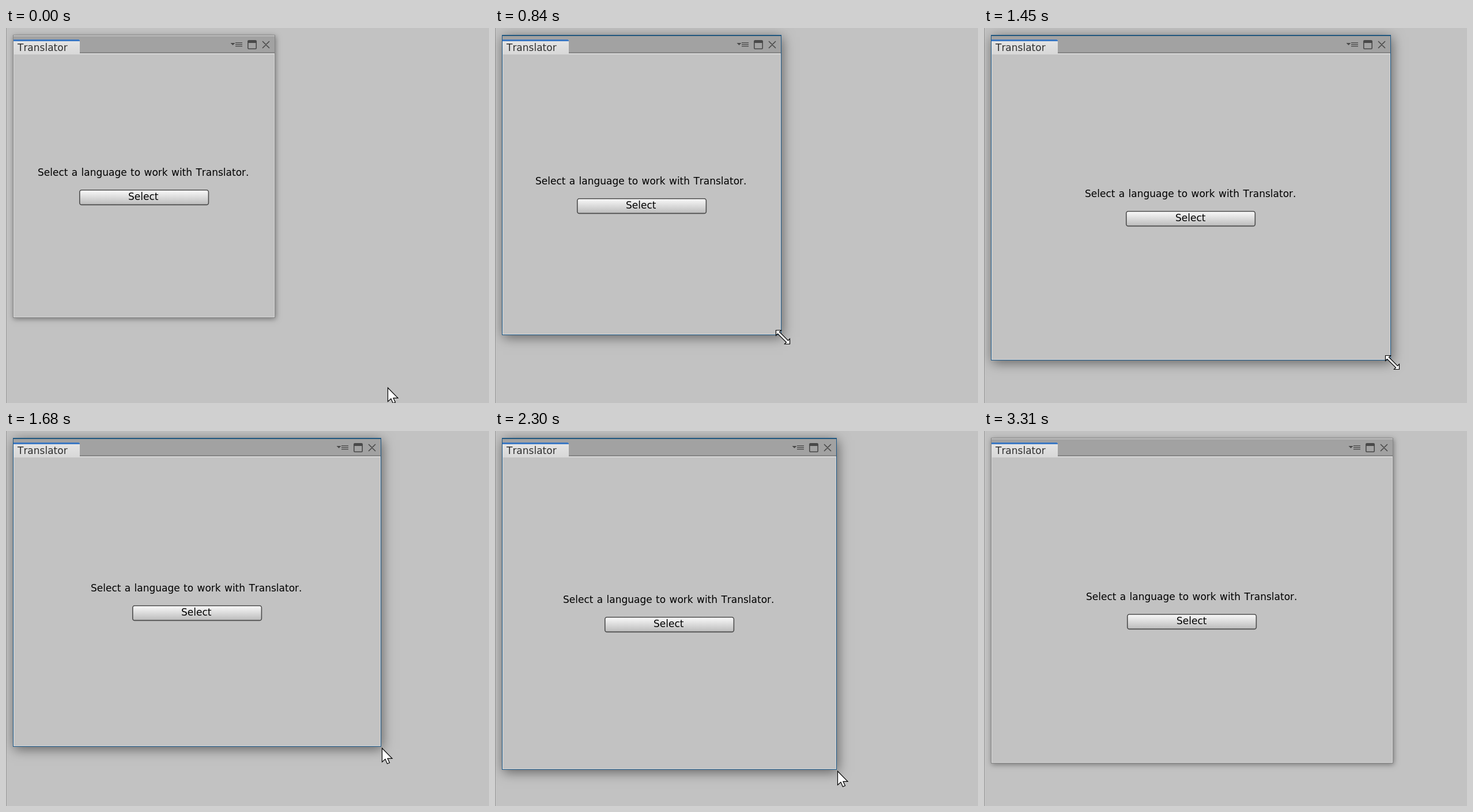
Recreate the animation shown at these times as an HTML page with a canvas. Size 838x652 px, loop 3390 ms.

```html
<!DOCTYPE html>
<html lang="en">
<head>
<meta charset="utf-8">
<title>Resizable window</title>
<style>
  html, body { margin: 0; width: 100%; height: 100%; overflow: hidden; background: #c2c2c2; }
  canvas { display: block; }
</style>
</head>
<body>
<canvas id="stage" width="838" height="652"></canvas>
<script>
const ctx = document.getElementById('stage').getContext('2d');
const LOOP = 3390, LEFT = 12, TOP = 12;
const FONT = '17px "DejaVu Sans", Verdana, sans-serif';

// Each path is a list of [step, x, y].
const approach = [[0, 662, 625], [1, 646, 614], [3, 555, 560], [5, 475, 512], [6, 467.5, 506.5]];
const corner = [
  [8, 466, 503], [9, 471, 509], [11, 496, 533], [14, 601, 582], [16, 665, 597],
  [19, 705, 577], [21, 676, 557], [25, 563, 524], [26, 551, 529], [28, 556, 563],
  [30, 592, 588], [31, 616, 595], [35, 708, 580], [36, 709, 577]
];
const leave = [[36, 711, 581], [37, 714, 593], [38, 717, 604]];

const arrow = [[0, 0], [0, 24], [5.5, 19], [9, 27], [13, 25.3], [9.5, 17.8], [17.5, 17.8]];
const doubleArrow = [
  [-12, -12], [-3, -12], [-6, -9], [9, 6], [12, 3],
  [12, 12], [3, 12], [6, 9], [-9, -6], [-12, -3]
];

// Smooth curve through the points of a path, held at both ends.
function along(path, k) {
  const last = path.length - 1;
  if (k <= path[0][0]) return path[0].slice(1);
  if (k >= path[last][0]) return path[last].slice(1);
  const i = path.findIndex(p => p[0] > k) - 1;
  const a = path[i], b = path[i + 1], span = b[0] - a[0], u = (k - a[0]) / span;
  const slope = (j, c) => {
    const p = path[Math.max(j - 1, 0)], q = path[Math.min(j + 1, last)];
    return (q[c] - p[c]) / (q[0] - p[0]);
  };
  return [1, 2].map(c =>
    a[c] * (1 + 2 * u) * (1 - u) ** 2 + b[c] * u * u * (3 - 2 * u) +
    span * (slope(i, c) * u * (1 - u) ** 2 + slope(i + 1, c) * u * u * (u - 1)));
}

function rect(x, y, w, h, fill) {
  ctx.fillStyle = fill;
  ctx.fillRect(x, y, w, h);
}

function frame(x, y, w, h, color, line = 1) {
  ctx.strokeStyle = color;
  ctx.lineWidth = line;
  ctx.strokeRect(x + line / 2, y + line / 2, w - line, h - line);
}

function shade(y0, y1, from, to) {
  const g = ctx.createLinearGradient(0, y0, 0, y1);
  g.addColorStop(0, from);
  g.addColorStop(1, to);
  return g;
}

function text(s, x, y, color, gap = 0) {
  ctx.font = FONT;
  ctx.fontKerning = 'none';
  ctx.wordSpacing = gap + 'px';
  ctx.fillStyle = color;
  ctx.fillText(s, x, y);
}

function polygon(points, x, y) {
  ctx.beginPath();
  for (const [px, py] of points) ctx.lineTo(x + px + .5, y + py + .5);
  ctx.closePath();
}

function cursor(points, x, y) {
  polygon(points, Math.round(x), Math.round(y));
  ctx.fillStyle = '#fff';
  ctx.fill();
  ctx.strokeStyle = '#000';
  ctx.lineWidth = 1.2;
  ctx.stroke();
}

function icons(r) {
  const ink = '#494949';
  polygon([[-77, 25.5], [-69, 25.5], [-73, 29.5]], r, 0);
  ctx.fillStyle = ink;
  ctx.fill();
  for (const y of [25, 28, 31]) rect(r - 68, y, 12, 1.3, ink);
  ctx.strokeStyle = ink;
  ctx.lineWidth = 1.6;
  ctx.beginPath();
  ctx.roundRect(r - 46.2, 21.8, 14.4, 14.4, 1.5);
  ctx.moveTo(r - 21, 23);
  ctx.lineTo(r - 9, 35);
  ctx.moveTo(r - 9, 23);
  ctx.lineTo(r - 21, 35);
  ctx.stroke();
  rect(r - 46, 22, 14, 4, ink);
}

function panel(r, b, active, raised) {
  const w = r - LEFT + 1, h = b - TOP + 1;
  ctx.save();
  ctx.shadowColor = raised ? 'rgba(0,0,0,.5)' : 'rgba(0,0,0,.4)';
  ctx.shadowBlur = raised ? 20 : 9;
  ctx.shadowOffsetX = raised ? 2 : 1;
  ctx.shadowOffsetY = raised ? 4 : 2;
  rect(LEFT, TOP, w, h, '#c2c2c2');
  ctx.restore();

  rect(LEFT, TOP, w, 31, '#a2a2a2');
  rect(LEFT, 42, w, 2, '#858585');
  frame(13, 44, w - 2, b - 44, '#d6d6d6');
  rect(13, 44, w - 2, 2, '#d6d6d6');
  frame(LEFT, TOP, w, h, active ? '#1b5685' : '#858585');
  rect(13, 13, w - 2, 1, active ? '#265878' : '#dedede');

  ctx.save();
  ctx.beginPath();
  ctx.roundRect(13, 20, 115, 26, [0, 2, 0, 0]);
  ctx.clip();
  rect(13, 20, 115, 26, shade(23, 45, '#e4e4e4', '#d8d8d8'));
  rect(13, 20, 115, 3, '#3b78c3');
  ctx.restore();
  text('Translator', 20, 40, '#303030');
  icons(r);

  const dx = (r - 466) / 2, dy = Math.floor((b - 503) / 2);
  const bx = 127 + Math.floor(dx), by = 281 + dy, tx = Math.round(dx);
  text('Select a language to work with Translator.', 55 + tx, 257 + dy, '#000', .95);
  ctx.beginPath();
  ctx.roundRect(bx + .8, by + .8, 223.6, 25.6, 3.5);
  ctx.fillStyle = shade(by, by + 27, '#fcfcfc', '#b9b9b9');
  ctx.fill();
  ctx.strokeStyle = '#4c4c4c';
  ctx.lineWidth = 1.6;
  ctx.stroke();
  text('Select', 212 + tx, 299 + dy, '#000');
}

function pointer(k, r, b) {
  if (k < 8) cursor(k < 5 ? arrow : doubleArrow, ...along(approach, k));
  else if (k < 21) cursor(doubleArrow, r + 3, b + 4);
  else if (k < 36) cursor(arrow, r + 2, b + 3);
  else if (k < 39) cursor(arrow, ...along(leave, k));
}

function draw(now) {
  const t = now % LOOP;
  // The screen is sampled in steps, slightly quicker at the start.
  const k = Math.floor((t + 8) / (t < 600 ? 74 : 76.7));
  const [r, b] = along(corner, k).map(Math.round);
  rect(0, 0, 838, 652, '#c2c2c2');
  rect(0, 0, 1, 652, '#999');
  panel(r, b, t >= 605 && t < 3310, k >= 8 && k < 39);
  pointer(k, r, b);
  requestAnimationFrame(() => draw(performance.now() - start));
}

const start = performance.now();
draw(0);
</script>
</body>
</html>
```
